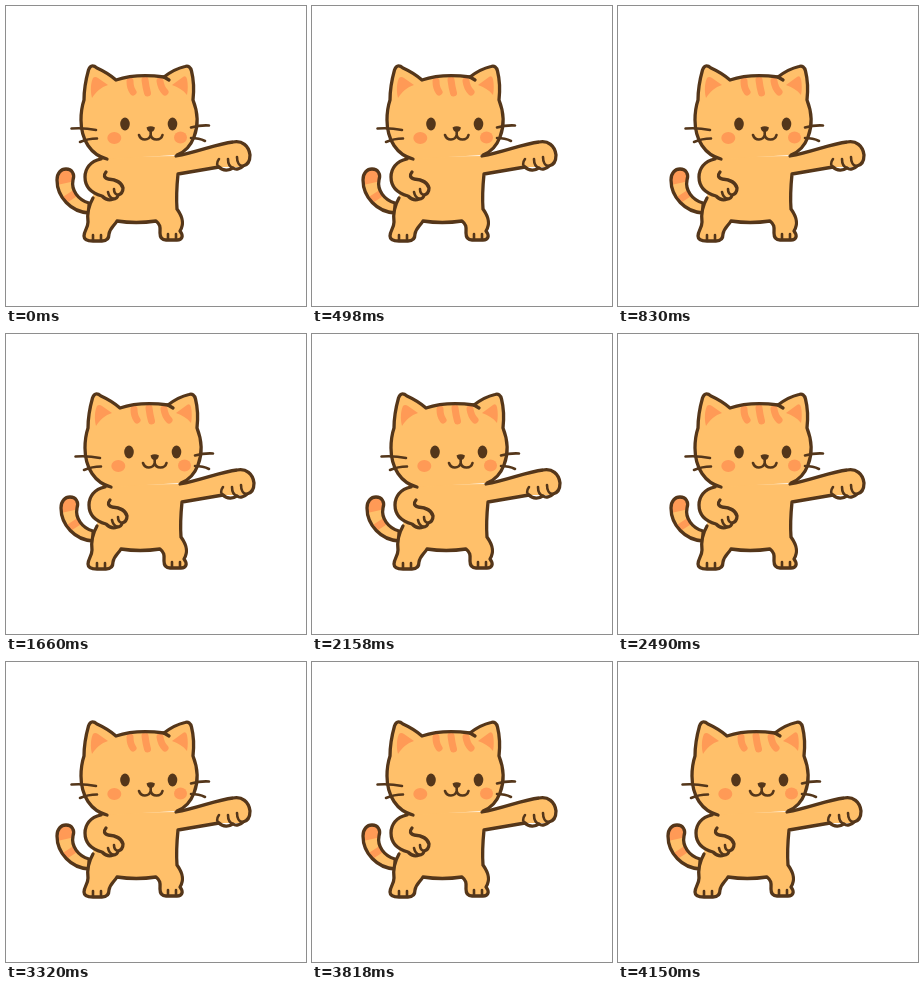
These frames come from a looping animation (300x300 px, 4.98 s). An HTML page:

```html
<!DOCTYPE html>
<html lang="en">
<head>
<meta charset="utf-8">
<title>Swaying cat</title>
<style>
  html, body { margin: 0; width: 100%; height: 100%; overflow: hidden; background: #fff; }
  svg { display: block; width: 100vw; height: 100vh; }
  .fur { fill: #ffc06a; }
  .mark { fill: #ff9a56; }
  .stripe { fill: none; stroke: #ff9a56; stroke-linecap: round; stroke-width: 7; }
  .line { stroke: #54361a; stroke-width: 3.3; stroke-linecap: round; stroke-linejoin: round; }
  .thin { stroke-width: 2.6; }
  .open { fill: none; }
  .dark { fill: #54361a; }
</style>
</head>
<body>
<svg viewBox="0 0 300 300">
  <defs>
    <path id="tailShape" d="M85 207C67 206 53 191 53 174C53 167 57 163 62 163C68 163 71 168 69 174C67 184 74 194 85 197Z"/>
    <clipPath id="tailClip"><use href="#tailShape"/></clipPath>
    <path id="headShape" d="M103 153C87 149 77 134 77 114C77 106 78 100 80 94C80 83 82 73 84.500 64
      Q87 57 93 62Q104 67 112 74C127 69 145 69 160 71Q170 63 181 60.500Q186 59 187.500 65
      C190 75 190 85 189 94C193 104 195 118 190 131C187 139 181 146 173 149"/>
  </defs>
  <g id="cat">
    <!-- tail -->
    <use href="#tailShape" class="fur"/>
    <g clip-path="url(#tailClip)">
      <path class="mark" d="M48 160H76V174L48 180Z"/>
      <path class="stripe" d="M56 197L73 186"/>
    </g>
    <use href="#tailShape" class="line open"/>

    <!-- body, legs and outstretched arm -->
    <path class="fur" d="M94 151L89 192C85 199 83 208 84 216C84 222 80 225 80 230C80 234 84 235 89 235
      L98 235C103 235 105 232 105 228C106 222 110 220 113 215Q132 218 152 215
      C157 219 156 222 156 227C156 232 158 234 162 234L173 234C178 234 180 230 176 225
      C181 217 178 210 173 203C172 190 173 178 174 168L215 161L239 161C253 151 243 133 229 136
      C212 138 194 146 172 150Z"/>
    <path class="line open" d="M89 192C85 199 83 208 84 216C84 222 80 225 80 230C80 234 84 235 89 235
      L98 235C103 235 105 232 105 228C106 222 110 220 113 215Q132 218 152 215
      C157 219 156 222 156 227C156 232 158 234 162 234L173 234C178 234 180 230 176 225
      C181 217 178 210 173 203C172 190 173 178 174 168L215 161
      C219 165 225 165 229 162C232 164 236 163 239 160C244 159 246 154 246 149
      C245 140 238 134 229 136C212 138 194 146 172 150"/>
    <path class="line thin open" d="M89 229V234M97 229V234M164 228V233M172 228V233
      M215 153C212 157 213 160 215 161M224 153C224 158 226 161 229 162M233 151C233 156 235 160 239 160"/>

    <!-- folded arm -->
    <path class="fur" d="M103 153C87 153 81 162 81 170C81 181 87 187 98 190C102 194 105 195 109 194
      C113 194 120 187 119 182Q117 174 104 173Z"/>
    <path class="line open" d="M97 153C86 155 81 163 81 171C81 181 87 187 98 190C102 194 105 195 109 193
      C112 193 114 191 114 189C118 188 119 185 119 182Q117 174 104 173Q98 171 102 166"/>
    <path class="line thin open" d="M104 186Q105 191 109 193M110 183Q110 188 114 189"/>

    <!-- head -->
    <use href="#headShape" class="fur"/>
    <g class="mark">
      <path d="M88 92C86 84 87 76 89 72Q91 70 94 72L104 79C97 81 92 86 88 92Z"/>
      <path d="M168 79L179 71Q182 69 183 73C184 78 184 84 183 89C179 84 174 81 168 79Z"/>
      <ellipse cx="110.300" cy="132" rx="7" ry="6"/>
      <ellipse cx="176.500" cy="131.500" rx="6.500" ry="6"/>
    </g>
    <path class="stripe" d="M126 75Q126 82 129 86M141 74Q142 82 143.500 87M156 75Q157 82 161 86"/>
    <use href="#headShape" class="line open"/>
    <path class="line open" d="M160 71L165 74"/>
    <path class="line thin open" d="M67.500 122.500Q80 121.500 92 124M76 136Q84 132.500 93 132.500
      M187 121.500Q196 119 205 119.500M187 132Q195 132 201 135"/>

    <!-- face -->
    <g class="dark">
      <ellipse cx="121" cy="118" rx="4.800" ry="6.500"/>
      <ellipse cx="168.500" cy="118" rx="4.800" ry="6.500"/>
      <path d="M142.500 121.500Q146.700 119 151 121.500Q150 126 146.700 126Q143.500 126 142.500 121.500Z"/>
    </g>
    <path class="line thin open" d="M146.700 125V129C145 135 137 135 135 129M146.700 129C148 135 157 135 158.500 129"/>
  </g>
</svg>
<script>
  const cat = document.getElementById('cat');
  const sway = [-2, 0, 2, 0, -2, -3];
  const hold = 830;

  function draw(now) {
    const step = Math.floor(now / hold) % sway.length;
    cat.setAttribute('transform', `translate(${sway[step]} 0)`);
    requestAnimationFrame(draw);
  }
  draw(performance.now());
</script>
</body>
</html>
```
